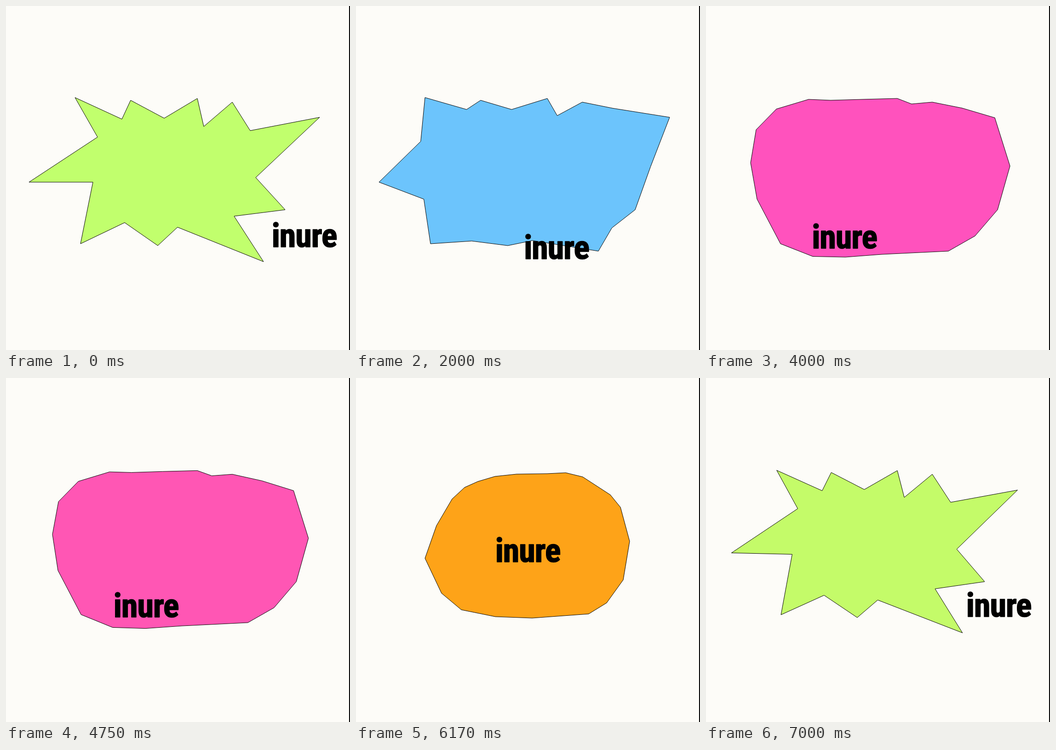
Write an HTML page that moves like this. It is 748 px wide and 748 px high and loops after 7.08 s.

```html
<!DOCTYPE html>
<html lang="en">
<head>
<meta charset="utf-8">
<title>inure</title>
<style>
  html, body { margin: 0; width: 100%; height: 100%; overflow: hidden; background: #fdfcf8; }
  svg { display: block; width: 100vw; height: 100vh; }
  polygon { stroke: #000; stroke-width: 1; stroke-miterlimit: 10; }
  text {
    font: bold 72px "Roboto Condensed", Roboto, sans-serif;
    font-stretch: 75%;
    letter-spacing: -1px;
    text-anchor: middle;
    stroke: #000; stroke-width: 1.5; stroke-linejoin: round;
  }
</style>
</head>
<body>
<svg viewBox="0 0 748 748">
  <polygon id="blob"/>
  <text id="word">inure</text>
  <rect x="746" width="2" height="748"/>
</svg>
<script>
const LOOP = 7080, FPS = 12, MOVE = 650;
const blob = document.getElementById('blob');
const word = document.getElementById('word');

// Outlines run clockwise from the top-left tip; later ones list only the points that move.
const star = [
  [150, 199], [252, 246], [271, 205], [344, 244], [416, 201],
  [430, 262], [492, 209], [531, 271], [682, 242], [543, 373],
  [607, 443], [496, 457], [560, 556], [373, 481], [330, 521],
  [258, 471], [162, 517], [189, 383], [50, 383], [199, 285]
];
const change = (shape, moved) => shape.map((p, i) => moved[i] || p);

const swollen = change(star, {
  1: [240.5, 225], 3: [338.4, 225], 5: [437.5, 238.4], 7: [558, 222.3],
  9: [640.4, 349.6], 11: [556.4, 482.5], 12: [527, 533], 13: [383.6, 510],
  15: [251.5, 511], 17: [147.5, 420], 19: [140.7, 294.4]
});
const pebble = change(swollen, {
  0: [153, 224], 1: [223, 203], 3: [340, 203], 5: [447, 213], 7: [557, 222],
  8: [628, 243], 9: [661, 348], 10: [634, 443], 11: [585, 500], 13: [382, 540],
  14: [303, 546], 15: [232, 544.5], 17: [111, 420], 18: [97, 341], 19: [109, 269]
});
const egg = [
  [236, 238], [265, 225], [302, 214], [349, 209], [416, 208],
  [456, 206], [493, 215], [553, 254], [575, 281], [595, 355],
  [581, 439], [545, 489], [506, 513], [383, 522], [303, 519],
  [229, 504], [186, 468], [175, 321], [150, 392], [209, 263]
];
[egg[17], egg[18]] = [egg[18], egg[17]];

// start: when the pose begins to turn into the next one
const poses = [
  { shape: star,    color: [193, 255, 109], text: [648.5, 524], start: 1255 },
  { shape: swollen, color: [108, 196, 252], text: [436, 550],   start: 2895 },
  { shape: pebble,  color: [255, 82, 189],  text: [301, 526.5], start: 4646 },
  { shape: egg,     color: [254, 163, 24],  text: [373.5, 400], start: 6445 }
];

// cubic-bezier(.42, 0, .58, 1), solved by bisection
function easeInOut(x) {
  let lo = 0, hi = 1, u = 0.5;
  for (let i = 0; i < 20; i++) {
    u = (lo + hi) / 2;
    const v = 1 - u;
    const at = 1.26 * v * v * u + 1.74 * v * u * u + u * u * u;
    if (at < x) lo = u; else hi = u;
  }
  return u * u * (3 - 2 * u);
}

const mix = (a, b, k) => a.map((v, i) => v + (b[i] - v) * k);

function draw(now) {
  const t = Math.floor((now % LOOP + 5) * FPS / 1000) * 1000 / FPS;
  let i = 0;
  while (i < 3 && t >= poses[i + 1].start) i++;
  const from = poses[i], to = poses[(i + 1) % 4];
  const x = Math.min(1, Math.max(0, (t - from.start) / MOVE));
  const k = x === 0 || x === 1 ? x : easeInOut(x);

  blob.setAttribute('points', from.shape.map((p, n) => mix(p, to.shape[n], k)).join(' '));
  blob.setAttribute('fill', `rgb(${mix(from.color, to.color, k).map(Math.round)})`);
  const [tx, ty] = mix(from.text, to.text, k);
  word.setAttribute('x', tx);
  word.setAttribute('y', ty);
}

const begin = performance.now();
function tick() {
  draw(performance.now() - begin);
  requestAnimationFrame(tick);
}
tick();
</script>
</body>
</html>
```
